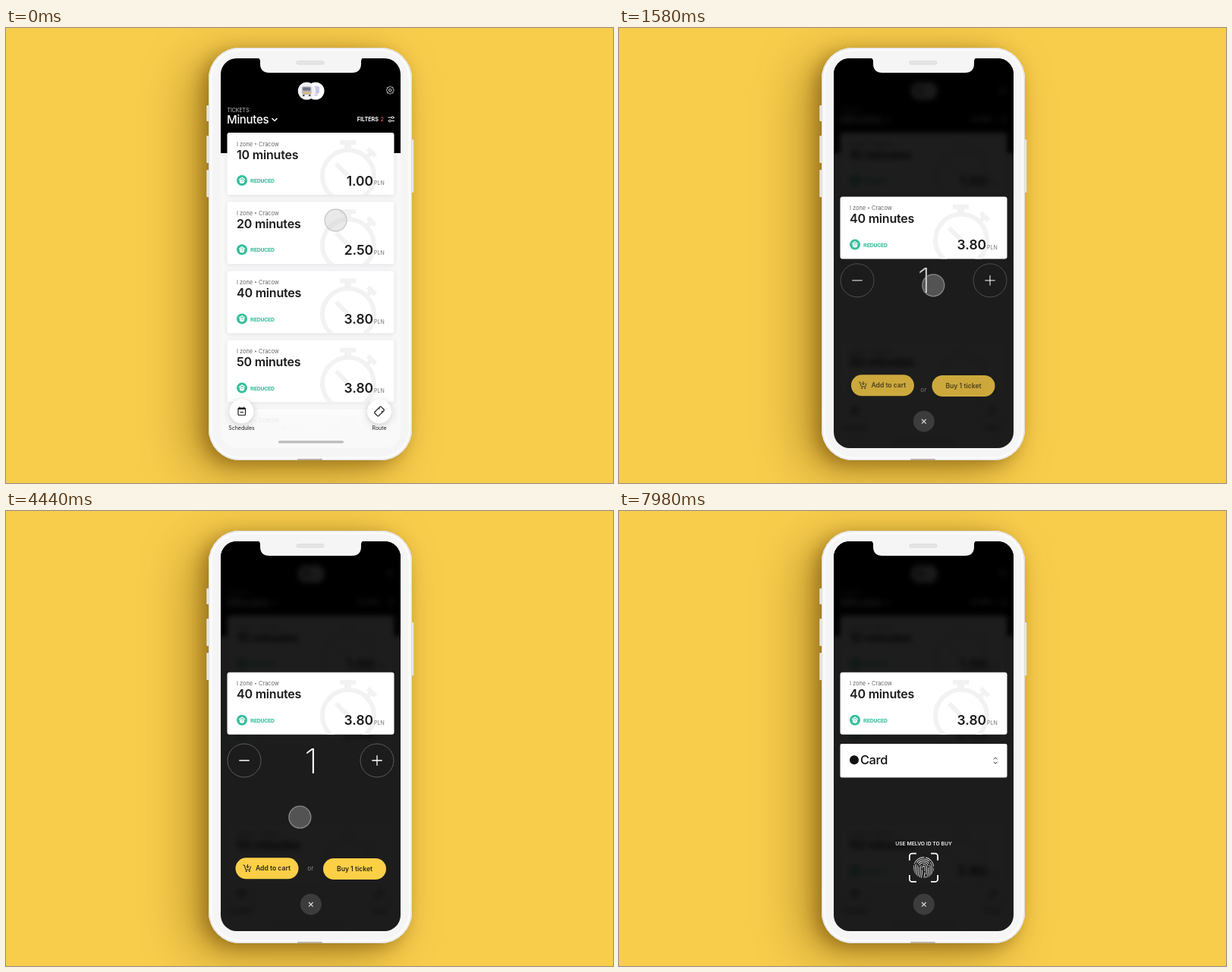
These frames come from a looping animation (800x600 px, 8 s). An HTML page with a canvas:

```html
<!DOCTYPE html>
<html lang="en">
<head>
<meta charset="utf-8">
<title>Ticket purchase</title>
<style>
html, body { margin: 0; width: 100%; height: 100%; overflow: hidden; background: #f8cd4c; }
canvas { display: block; }
</style>
</head>
<body>
<canvas id="stage" width="800" height="600"></canvas>
<script>
const LOOP = 8000, W = 800, H = 600, TAU = Math.PI * 2;
const CARD = { x: 291.5, w: 220, h: 82, top: 138, pitch: 91.2 };
const SCREEN = [283, 40, 237, 514, 21];
const INK = '#1b1b1d', BODY = '#f5f5f5';
const stage = document.getElementById('stage').getContext('2d');

const clamp = v => Math.max(0, Math.min(1, v));
const smooth = p => p * p * (3 - 2 * p);
const cubic = p => p < .5 ? 4 * p ** 3 : 1 - 4 * (1 - p) ** 3;
const ramp = (t, a, b, ease = smooth) => ease(clamp((t - a) / (b - a)));
const mix = (a, b, p) => a + (b - a) * p;

function box(c, x, y, w, h, r, fill) {
  c.beginPath();
  c.roundRect(x, y, w, h, r);
  if (fill) { c.fillStyle = fill; c.fill(); }
}

function disc(c, x, y, r, fill, stroke, width = 1) {
  c.beginPath();
  c.arc(x, y, r, 0, TAU);
  if (fill) { c.fillStyle = fill; c.fill(); }
  if (stroke) { c.strokeStyle = stroke; c.lineWidth = width; c.stroke(); }
}

// Each line is a flat list of x, y pairs.
function lines(c, color, width, ...paths) {
  c.strokeStyle = color;
  c.lineWidth = width;
  c.beginPath();
  for (const p of paths) {
    c.moveTo(p[0], p[1]);
    for (let i = 2; i < p.length; i += 2) c.lineTo(p[i], p[i + 1]);
  }
  c.stroke();
}

function text(c, str, x, y, size, weight, color, align = 'left', spacing = 0) {
  c.font = `${weight} ${size}px Inter, sans-serif`;
  c.letterSpacing = spacing + 'px';
  c.textAlign = align;
  c.fillStyle = color;
  c.fillText(str, x, y);
  c.letterSpacing = '0px';
}

function shadow(c, color, blur, dx, dy, draw) {
  c.save();
  c.shadowColor = color;
  c.shadowBlur = blur;
  c.shadowOffsetX = dx;
  c.shadowOffsetY = dy;
  draw();
  c.restore();
}

function layer(draw) {
  const cv = document.createElement('canvas');
  cv.width = W;
  cv.height = H;
  draw(cv.getContext('2d'));
  return cv;
}

function stopwatch(c, y) {
  const cx = 451, cy = y + 57, tint = '#f2f2f2';
  disc(c, cx, cy, 34, null, tint, 6);
  c.fillStyle = tint;
  c.fillRect(440, y + 10, 21, 6);
  c.fillRect(446, y + 15, 9, 8);
  lines(c, tint, 6, [cx - 16, cy - 16, cx - 1, cy - 1]);
  lines(c, tint, 6, [cx + 23, cy - 23, cx + 31, cy - 31]);
  lines(c, tint, 6, [cx + 26, cy - 36, cx + 36, cy - 26]);
}

function reducedBadge(c, y) {
  disc(c, 311, y, 7, '#35bf9c');
  c.fillStyle = '#fff';
  c.beginPath();
  c.ellipse(311, y + 1.2, 3.2, 2.8, 0, 0, TAU);
  c.fill();
  lines(c, '#fff', 1.2, [307, y - .8, 311, y - 3.8, 315, y - 1]);
  disc(c, 311.2, y + .7, 1, '#8fdcc8');
  c.font = 'bold condensed 7.6px Roboto, sans-serif';
  c.letterSpacing = '-0.2px';
  c.textAlign = 'left';
  c.fillStyle = '#35bf9c';
  c.fillText('REDUCED', 322, y + 3.2);
  c.letterSpacing = '0px';
}

function card(c, y, title, price) {
  const { x, w, h } = CARD;
  shadow(c, 'rgba(40,30,60,.12)', 6, 0, 1, () => box(c, x, y, w, h, 3, '#fff'));
  c.save();
  box(c, x, y, w, h, 3);
  c.clip();
  stopwatch(c, y);
  c.restore();
  text(c, 'I zone', 304, y + 17.5, 7.4, 400, '#666');
  disc(c, 329, y + 14.8, .9, '#666');
  text(c, 'Cracow', 333, y + 17.5, 7.4, 400, '#666');
  text(c, title, 304, y + 34.5, 16, 600, INK, 'left', -.2);
  reducedBadge(c, y + 63);
  text(c, price, 484, y + 69.5, 17.4, 600, INK, 'right');
  text(c, 'PLN', 485, y + 69.3, 7, 400, '#777');
}

function header(c) {
  c.fillStyle = '#000';
  c.fillRect(283, 40, 237, 125);
  disc(c, 408, 83, 11.5, '#fff');
  box(c, 405, 76, 6, 14, 2, '#d9d6ee');
  box(c, 408, 77, 5, 9, 1, '#c8c6e4');
  disc(c, 396.3, 83, 11.5, '#fff');
  disc(c, 396.3, 83, 10.8, '#f2f0f8');
  box(c, 390, 77, 12.5, 11, 2, '#b9b4bb');
  box(c, 391.2, 78.5, 10, 4, 1, '#6f7487');
  box(c, 391, 84.5, 10.5, 2.5, .5, '#d8bd79');
  c.fillStyle = '#555';
  c.fillRect(391, 88, 2.5, 2);
  c.fillRect(399, 88, 2.5, 2);

  c.beginPath();
  for (let i = 0; i < 48; i++) {
    const a = i / 48 * TAU, r = 4.6 + .6 * Math.cos(a * 8);
    c.lineTo(506.3 + r * Math.cos(a), 82 + r * Math.sin(a));
  }
  c.closePath();
  c.strokeStyle = '#ddd';
  c.lineWidth = 1;
  c.stroke();
  disc(c, 506.3, 82, 1.7, null, '#ddd');

  text(c, 'TICKETS:', 291.5, 111, 6.9, 400, '#ccc');
  text(c, 'Minutes', 291, 125.8, 15, 500, '#fff', 'left', -.3);
  lines(c, '#fff', 1.5, [350.5, 119, 354, 122.5, 357.5, 119]);
  text(c, 'FILTERS', 491, 123, 7.2, 700, '#fff', 'right');
  text(c, '2', 493.5, 123, 7.2, 600, '#e0455a');
  lines(c, '#fff', 1, [503.5, 118, 512, 118], [503.5, 122.5, 512, 122.5]);
  disc(c, 509.5, 118, 1.4, '#000', '#fff', .9);
  disc(c, 506, 122.5, 1.4, '#000', '#fff', .9);
}

function tabBar(c) {
  const fade = c.createLinearGradient(0, 488, 0, 530);
  fade.addColorStop(0, 'rgba(249,249,250,0)');
  fade.addColorStop(.65, 'rgba(249,249,250,.88)');
  fade.addColorStop(1, 'rgba(249,249,250,1)');
  c.fillStyle = fade;
  c.fillRect(283, 488, 237, 66);
  for (const x of [310.5, 492])
    shadow(c, 'rgba(0,0,0,.18)', 8, 0, 2, () => disc(c, x, 505.5, 16, '#fff'));

  c.strokeStyle = INK;
  c.lineWidth = 1.2;
  box(c, 306, 501, 9.5, 9.5, 1);
  c.stroke();
  lines(c, INK, 2, [306, 502, 315.5, 502]);
  lines(c, INK, 1.2, [308.5, 506.8, 313, 506.8]);
  lines(c, INK, 1, [308, 499.5, 308, 501], [313.5, 499.5, 313.5, 501]);

  c.save();
  c.translate(492, 505.5);
  c.rotate(-Math.PI / 4);
  box(c, -6, -3.7, 12, 7.4, 1.3);
  c.strokeStyle = INK;
  c.lineWidth = 1.2;
  c.stroke();
  lines(c, INK, 1, [2.5, -3.7, 2.5, -1.5], [2.5, 3.7, 2.5, 1.5]);
  c.restore();

  text(c, 'Schedules', 310.5, 530, 7, 400, '#222', 'center');
  text(c, 'Route', 492, 530, 7, 400, '#222', 'center');
  box(c, 359, 544.3, 86, 3.2, 1.6, '#bcbcbd');
}

// The third card is drawn separately because it lifts out of the list.
const list = layer(c => {
  c.fillStyle = '#f8f8f9';
  c.fillRect(283, 40, 237, 514);
  header(c);
  [['10', '1.00'], ['20', '2.50'], null, ['50', '3.80'], ['60', '5.00']].forEach((d, i) => {
    if (d) card(c, CARD.top + i * CARD.pitch, d[0] + ' minutes', d[1]);
  });
  tabBar(c);
});

const blurred = layer(c => {
  c.filter = 'blur(3.5px)';
  c.drawImage(list, 0, 0);
});

const backdrop = layer(c => {
  c.fillStyle = '#f8cd4c';
  c.fillRect(0, 0, W, H);
  const body = () => box(c, 267, 26, 268, 544, 41, BODY);
  shadow(c, 'rgba(110,75,0,.42)', 64, -26, 16, body);
  shadow(c, 'rgba(100,65,0,.45)', 22, -8, 6, body);
  for (const [y, h] of [[102, 21], [142, 36], [187, 36]]) box(c, 264.3, y, 4, h, 1, '#e6e6e6');
  box(c, 533, 147, 4.3, 70, 1, '#e6e6e6');
  body();
  box(c, 267.5, 26.5, 267, 543, 40.5);
  c.strokeStyle = '#dedede';
  c.lineWidth = 1;
  c.stroke();
  box(c, 270.5, 29.5, 261, 537, 37.5);
  c.strokeStyle = '#fcfcfc';
  c.lineWidth = 2;
  c.stroke();
  box(c, 384, 568, 33, 2, 1, '#b9b4a6');
});

function notch(c) {
  c.fillStyle = BODY;
  c.beginPath();
  c.moveTo(331, 39);
  c.quadraticCurveTo(335, 40, 335, 44);
  c.lineTo(335, 47);
  c.quadraticCurveTo(335, 59, 347, 59);
  c.lineTo(456, 59);
  c.quadraticCurveTo(468, 59, 468, 47);
  c.lineTo(468, 44);
  c.quadraticCurveTo(468, 40, 472, 39);
  c.fill();
  box(c, 383, 43.7, 36, 4.2, 2.1, '#e6e6e6');
  c.strokeStyle = '#d2d2d2';
  c.lineWidth = .7;
  c.stroke();
}

function digit(c, n, y, alpha) {
  const base = c.globalAlpha;
  c.globalAlpha = base * alpha;
  text(c, n, 402, y, 45, 200, '#fff', 'center');
  c.globalAlpha = base;
}

function stepper(c, y, t) {
  for (const x of [314, 489]) {
    disc(c, x, y, 22, null, '#5c5c5c');
    lines(c, '#fff', 1.3, [x - 6.7, y, x + 6.7, y]);
  }
  lines(c, '#fff', 1.3, [489, y - 6.7, 489, y + 6.7]);
  const two = ramp(t, 2220, 2400) * (1 - ramp(t, 3680, 3860));
  if (two < 1) digit(c, '1', y + 16.5 - 10 * two, 1 - two);
  if (two > 0) digit(c, '2', y + 16.5 + 10 * (1 - two), two);
}

function cart(c, x, y) {
  lines(c, INK, 1, [x - 5, y - 4, x - 3.3, y - 4, x - 1.5, y + 2, x + 3.8, y + 2, x + 5.2, y - 2.5]);
  lines(c, INK, 1, [x + 1, y - 5, x + 1, y - 1], [x - 1, y - 2.5, x + 1, y - .6, x + 3, y - 2.5]);
  disc(c, x - .8, y + 4, .9, INK);
  disc(c, x + 3.4, y + 4, .9, INK);
}

function controls(c, t) {
  const enter = ramp(t, 1300, 1700), leave = ramp(t, 4900, 5280);
  const alpha = enter * (1 - leave), off = 1 - enter;
  if (alpha <= 0) return;
  c.save();
  c.globalAlpha = alpha;
  stepper(c, 329 + 18 * off - 11 * leave, t);
  const ax = 302.5 + 16 * off, bx = 418 - 26 * off;
  box(c, ax, 457.3, 83, 28, 14, '#fdcf46');
  cart(c, ax + 15, 471);
  text(c, 'Add to cart', ax + 26.5, 474.4, 8.6, 600, '#2b2618');
  text(c, 'or', 401.3, 473.5 + 32 * off, 8.2, 400, '#8a8a8a', 'center');
  box(c, bx, 458, 83, 28, 14, '#fdcf46');
  text(c, 'Buy 1 ticket', bx + 41.5, 475, 8.6, 600, '#2b2618', 'center');
  c.restore();
}

function fingerprint(c) {
  c.save();
  c.beginPath();
  c.ellipse(401.5, 470, 13.8, 14.2, 0, 0, TAU);
  c.clip();
  c.strokeStyle = '#c6c6c6';
  c.lineWidth = 1.1;
  for (let i = 0; i < 6; i++) {
    const r = 1.6 + i * 2.35;
    c.setLineDash(i % 2 ? [17, 1.8] : [11 + i * 2, 1.6]);
    c.beginPath();
    c.moveTo(401.5 - r - 1.5, 484);
    c.quadraticCurveTo(401.5 - r, 477, 401.5 - r, 470);
    c.arc(401.5, 470, r, Math.PI, TAU);
    c.quadraticCurveTo(401.5 + r, 477, 401.5 + r - 1, 484);
    c.stroke();
  }
  c.restore();
}

function payment(c, t) {
  const p = ramp(t, 5350, 5900);
  if (p <= 0) return;
  c.save();
  c.globalAlpha = p;
  c.translate(0, 12 * (1 - p));
  box(c, 291.5, 307, 220, 44.5, 2, '#fff');
  disc(c, 310, 328.3, 6, '#111');
  text(c, 'Card', 318, 334.3, 16.4, 500, '#111', 'left', -.4);
  lines(c, '#333', 1, [494, 327.5, 496.3, 325, 498.6, 327.5], [494, 330.8, 496.3, 333.3, 498.6, 330.8]);
  text(c, 'USE MELVO ID TO BUY', 401.5, 441.2, 6.8, 600, '#eee', 'center');
  c.strokeStyle = '#fff';
  c.lineWidth = 1.8;
  for (const sx of [-1, 1]) for (const sy of [-1, 1]) {
    const x = 401.5 + sx * 18.6, y = 470.3 + sy * 18.6;
    c.beginPath();
    c.moveTo(x - sx * 9, y);
    c.arcTo(x, y, x, y - sy * 9, 3.5);
    c.lineTo(x, y - sy * 9);
    c.stroke();
  }
  fingerprint(c);
  c.restore();
}

// Touch path: time, x, y
const touch = [
  [0, 434.5, 253.5], [1080, 414.3, 339.3], [1680, 414.3, 339.3], [2120, 488, 334],
  [2380, 488, 334], [3000, 400, 334], [3480, 331, 333], [3640, 311, 332],
  [4150, 311, 332], [4720, 459, 471], [5100, 459, 471]
];

function cursor(c, t) {
  const alpha = 1 - ramp(t, 4880, 5080);
  if (alpha <= 0) return;
  const i = Math.max(1, touch.findIndex(k => k[0] >= t));
  const [t0, x0, y0] = touch[i - 1], [t1, x1, y1] = touch[i];
  const glide = i === 5 ? p => p * p : i === 6 ? p => 1 - (1 - p) ** 2 : smooth;
  const p = ramp(t, t0, t1, glide);
  c.save();
  c.globalAlpha = alpha;
  disc(c, mix(x0, x1, p), mix(y0, y1, p), 14.5, 'rgba(190,190,192,.34)', 'rgba(180,176,180,.65)', 1.3);
  c.restore();
}

function render(t) {
  const c = stage;
  c.drawImage(backdrop, 0, 0);
  c.save();
  box(c, ...SCREEN);
  c.clip();
  c.drawImage(list, 0, 0);
  const dim = ramp(t, 1190, 1500);
  if (dim > 0) {
    c.globalAlpha = dim;
    c.drawImage(blurred, 0, 0);
    c.globalAlpha = 1;
    c.fillStyle = `rgba(0,0,0,${.885 * dim})`;
    c.fillRect(283, 40, 237, 514);
  }
  const lift = ramp(t, 1230, 1720, cubic);
  card(c, mix(CARD.top + 2 * CARD.pitch, 212.8, lift), '40 minutes', '3.80');
  controls(c, t);
  payment(c, t);
  if (dim > 0) {
    c.globalAlpha = dim;
    disc(c, 401.8, 518.7, 14, '#3c3c3c');
    lines(c, '#ddd', 1.2, [399, 516, 404.6, 521.6], [404.6, 516, 399, 521.6]);
    c.globalAlpha = 1;
  }
  cursor(c, t);
  c.restore();
  notch(c);
}

const start = performance.now();
function tick() {
  render((performance.now() - start) % LOOP);
  requestAnimationFrame(tick);
}
tick();
</script>
</body>
</html>
```
